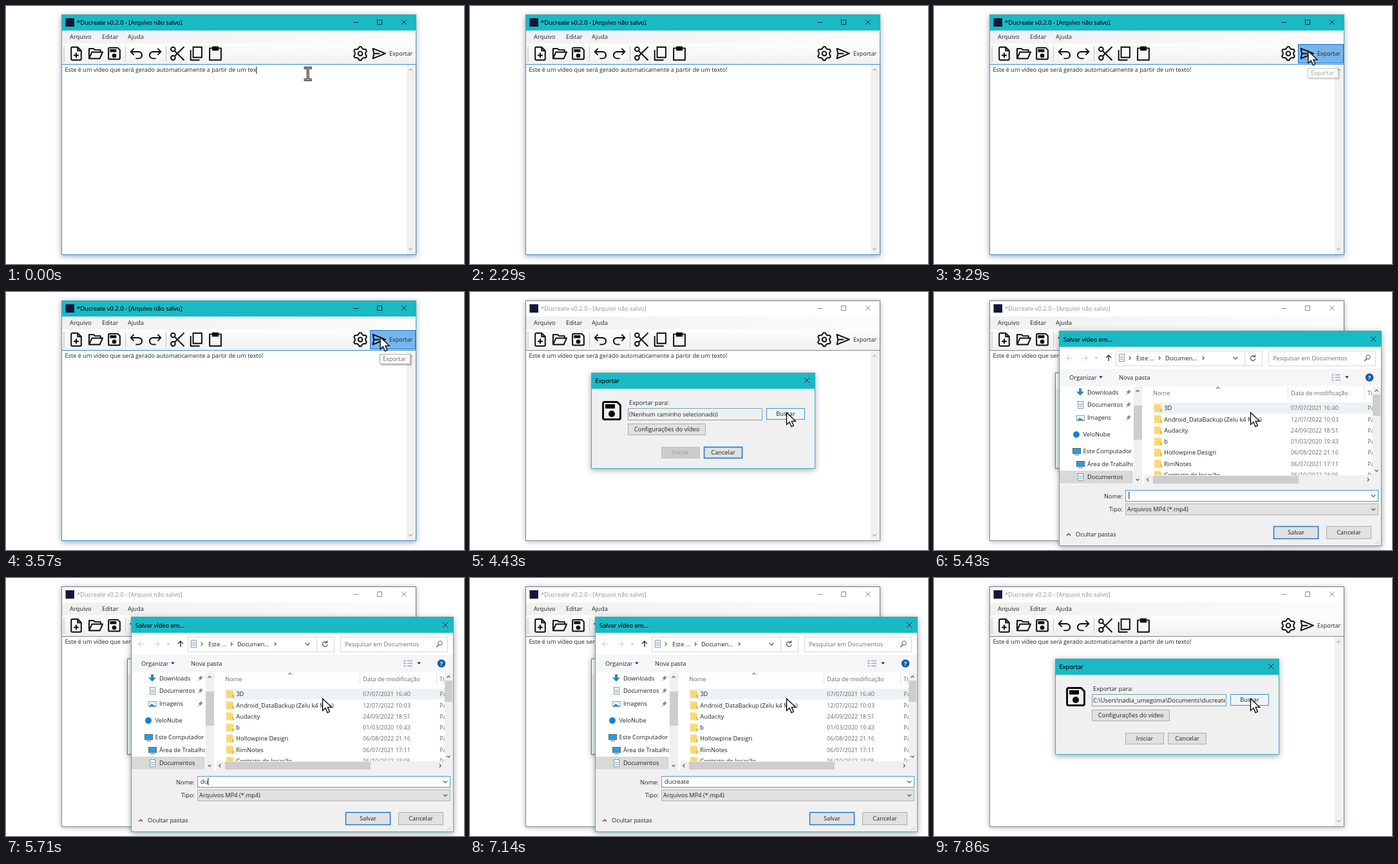
An HTML page for the animation above (8 s loop, 711x400 px).

```html
<!DOCTYPE html>
<html lang="pt-BR">
<head>
<meta charset="utf-8">
<title>Exportar vídeo</title>
<style>
  html, body { margin: 0; width: 100%; height: 100%; overflow: hidden; background: #fff; }
  svg { display: block; }
  #stage { width: 100vw; height: 100vh; }
  text { font: 9.3px "Open Sans", "Noto Sans", sans-serif; fill: #222; white-space: pre; }
  .win { filter: drop-shadow(0 2px 5px rgba(0, 0, 0, .36)); }
  .win.off { filter: drop-shadow(0 1px 4px rgba(0, 0, 0, .3)); }
  .bar { fill: #18bac5; }
  .cap { fill: #000; stroke: #000; stroke-width: .15; }
  .ctl { stroke: #0b2526; }
  .edge { fill: none; stroke: #3fa9b8; }
  .off .bar { fill: #fff; }
  .off .cap { fill: #8f8f8f; stroke: none; }
  .off .ctl { stroke: #8a8a8a; }
  .off .edge { stroke: #787878; }
  .dim { fill: #6d6d6d; }
  .mid { text-anchor: middle; }
</style>
</head>
<body>
<svg id="stage" viewBox="0 0 711 400" preserveAspectRatio="none"></svg>
<script>
const FPS = 7, LOOP = 8000;
const $ = id => document.getElementById(id);

// Markup helpers
const text = (x, y, s, more = '') => `<text x="${x}" y="${y + 3.3}" ${more}>${s}</text>`;
const rect = (x, y, w, h, fill, more = '') =>
  `<rect x="${x}" y="${y}" width="${w}" height="${h}" fill="${fill}" ${more}/>`;
const frame = (x, y, w, h, fill, line, more = '') =>
  rect(x + .5, y + .5, w - 1, h - 1, fill, `stroke="${line}" ${more}`);
const line = (d, color = '#111', width = 1, more = '') =>
  `<path d="${d}" fill="none" stroke="${color}" stroke-width="${width}" ${more}/>`;
const fill = (d, color) => `<path d="${d}" fill="${color}"/>`;
const disc = (x, y, r, color) => `<circle cx="${x}" cy="${y}" r="${r}" fill="${color}"/>`;
const clip = (x, y, w, h, body) =>
  `<svg x="${x}" y="${y}" width="${w}" height="${h}" viewBox="${x} ${y} ${w} ${h}">${body}</svg>`;
const group = (id, body, cls = '') => `<g id="${id}" class="${cls}">${body}</g>`;
const turns = { up: [-1, 0], down: [1, 0], left: [0, -1], right: [0, 1] };
function chevron(x, y, dir, color = '#555', r = 2.5, width = 1.1) {
  const [v, h] = turns[dir], k = r / 2;
  const d = v ? `M${x - r} ${y - v * k}l${r} ${v * r} ${r} ${-v * r}`
              : `M${x - h * k} ${y - r}l${h * r} ${r} ${-h * r} ${r}`;
  return line(d, color, width);
}
const cross = (x, y) => line(`M${x - 3.7} ${y - 3.7}l7.4 7.4m0-7.4l-7.4 7.4`, '', 1, 'class="ctl"');
const button = (x, y, w, h, label, id = '') =>
  `<g id="${id}">${frame(x, y, w, h, '#e1e1e1', '#adadad')}${text(x + w / 2, y + h / 2, label, 'class="mid"')}</g>`;
// 24-unit line icon centred on a point
const icon = (x, y, body, k = 1.11) =>
  `<g transform="translate(${x} ${y}) scale(${k}) translate(-12 -12)" fill="none" stroke="#0a0a0a" stroke-width="1.75" stroke-linejoin="round">${body}</g>`;
const path = (d, more = '') => `<path d="${d}" ${more}/>`;

const gear = 'M' + Array.from({ length: 24 }, (_, i) => {
  const a = (i - 1.5) * Math.PI / 12, r = i % 4 === 1 || i % 4 === 2 ? 9.6 : 7.4;
  return `${(12 + r * Math.sin(a)).toFixed(2)} ${(12 - r * Math.cos(a)).toFixed(2)}`;
}).join('L') + 'z';
const solid = 'fill="#0a0a0a" stroke="none"';
const floppy = path('M4 5.5Q4 4 5.5 4H17l3 3v11.5q0 1.5-1.5 1.5h-13Q4 20 4 18.5z')
  + path('M6 6h9v4H6z', solid) + `<circle cx="12" cy="15" r="3" ${solid}/>`;

const toolbar = [
  [109, path('M14 3H6.500Q5 3 5 4.500v15Q5 21 6.500 21h11q1.500 0 1.500-1.500V8zv5h5M12 11v7M8.500 14.500h7')],
  [139, path('M3 19V5h6l2 2h8v3M3 19h15l4-9H7z')],
  [168, floppy],
  [202.500, path('M8.500 5 4 9.500l4.500 4.500M4 9.500h11a4.700 4.700 0 0 1 0 9.400h-4')],
  [231.500, path('M15.500 5 20 9.500l-4.500 4.500M20 9.500H9a4.700 4.700 0 0 0 0 9.400h4')],
  [266, '<circle cx="6" cy="6" r="3"/><circle cx="6" cy="18" r="3"/>' + path('M8.300 8.300 21.500 21.500M8.300 15.700 21.500 2.500')],
  [295, path('M8 3h12v14.500H8zM4.500 7v14H17')],
  [325, path('M4 4.500h16V21H4z') + path('M7.500 2h9v6h-9z', solid)],
  [550, path(gear) + '<circle cx="12" cy="12" r="3"/>'],
  [579, path('M3.500 5 21 12 3.500 19l1.500-7zM5 12h8')]
];

function mainWindow() {
  return rect(86, 13, 551, 373, '#fff')
    + rect(86, 13, 551, 25, '', 'class="bar"')
    + rect(92.5, 19, 13.500, 13, '#15173a')
    + text(110, 25.5, '*Ducreate v0.2.0 - [Arquivo não salvo]', 'class="cap"')
    + line('M539 25.500h8', '', 1, 'class="ctl"')
    + line('M576.500 21.500h7v7h-7z', '', 1, 'class="ctl"') + cross(618, 25)
    + rect(86, 38, 551, 20, 'url(#menu)') + rect(86, 58, 551, 32, 'url(#tools)')
    + text(99, 48, 'Arquivo') + text(149, 48, 'Editar') + text(189, 48, 'Ajuda')
    + line('M90 62v24', '#999', 1.5, 'stroke-dasharray="1.5 1.7"')
    + line('M185.500 62v24M248.500 62v24', '#c4c4c4')
    + frame(565, 59, 71, 30, '#76b5ec', '#1f74bd', 'id="hot"')
    + toolbar.map(([x, body]) => icon(x, 73.7, body)).join('')
    + text(595, 73.5, 'Exportar', 'style="font-size:9px"')
    + rect(622, 91, 14, 294, '#f0f0f0')
    + chevron(628, 99, 'up', '#a5a5a5') + chevron(628, 377, 'down', '#a5a5a5')
    + text(91.5, 99, '', 'id="story" style="font-size:9.200px"')
    + rect(0, 94, 1, 11, '#111', 'id="caret"')
    + frame(86, 13, 551, 373, 'none', '', 'class="edge"')
    + frame(86, 90, 551, 296, 'none', '#4d93cb', 'id="focus"');
}

function exportDialog() {
  return rect(188, 125, 348, 149, '#f0f0f0')
    + rect(188, 125, 348, 25, '', 'class="bar"')
    + text(194.5, 137.5, 'Exportar', 'class="cap"') + cross(523, 137)
    + icon(220, 184, floppy, 1.68)
    + text(247, 172, 'Exportar para:')
    + frame(245, 180, 209, 19, '#f0f0f0', '#7d9fb0')
    + clip(246, 181, 206, 17, text(247, 189.5, '', 'id="dest"'))
    + button(460, 180, 60, 18, 'Buscar', 'browse')
    + button(245, 204, 121, 18, 'Configurações do vídeo')
    + button(297, 240, 60, 18, 'Iniciar', 'start')
    + button(363, 240, 60, 18, 'Cancelar', 'cancel')
    + frame(188, 125, 348, 149, 'none', '', 'class="edge"');
}

const page = (x, y) => frame(x - 4, y - 6, 9, 12, '#fafafa', '#8c9aa5') + line(`M${x - 2} ${y - 1}h5m-5 3h5`, '#4e9ad0');
const screen = (x, y) => frame(x - 6, y - 5, 13, 9, '#2f9be0', '#4a6a80') + line(`M${x - 3} ${y + 5.500}h7`, '#56707f');
const photo = (x, y) => frame(x - 6, y - 4, 13, 9, '#e8f4fb', '#8ba5b5') + fill(`M${x - 5} ${y + 4}l4-4 3 2 4 2z`, '#3d86ad');
const arrow = (x, y) => fill(`M${x - 2} ${y - 6}h4v5h4l-6 6-6-6h4z`, '#2d7fd3');
const star = (x, y) => fill(`M${x} ${y - 6}l1.700 4 4.300.300-3.300 2.800 1 4.200-3.700-2.300-3.700 2.300 1-4.200-3.300-2.800 4.300-.300z`, '#2a7fd0');
const cloud = (x, y) => disc(x, y, 5, '#1580d0');
const pin = y => line(`M298 ${y + 4}l3-3`, '#7b8c98') + fill(`M298.500 ${y - 1}l2-.5 2-2.500 3 3-2.500 2-.5 2z`, '#7b8c98');

// label, y, indent, icon, pinned
const places = [
  ['Acesso rápido', 169, 0, star], ['Área de Trabalho', 188, 1, screen, 1],
  ['Downloads', 207.5, 1, arrow, 1], ['Documentos', 227, 1, page, 1], ['Imagens', 247, 1, photo, 1],
  ['VeloNube', 273, 0, cloud], ['Este Computador', 299, 0, screen],
  ['Área de Trabalho', 319, 1, screen], ['Documentos', 339, 1, page]
];
const tree = places.map(([name, y, deep, mark, pinned]) =>
  mark(deep ? 227 : 221, y) + text(deep ? 238 : 231.5, y, name) + (pinned ? pin(y) : '')).join('');

const files = [
  ['3D', '07/07/2021 16:40'], ['Android_DataBackup (Zelu k4 Mini)', '12/07/2022 10:03'],
  ['Audacity', '24/09/2022 18:51'], ['b', '01/03/2020 19:43'],
  ['Hollowpine Design', '06/08/2022 21:16'], ['RimNotes', '06/07/2021 17:11'],
  ['Contrato de locação', '06/10/2022 23:05']
];
const rows = files.map(([name, date], i) => {
  const y = 180 + i * 17.25;
  return fill(`M342 ${y - 6}h9l2 2v10h-11z`, '#fbd774') + fill(`M351 ${y + 1}h3v5h-3z`, '#eebf4a')
    + text(357.3, y, name) + text(554, y, date, 'class="dim" style="font-size:9.100px"')
    + text(673, y, 'Pasta', 'class="dim"');
}).join('');

function readyParts() {
  const nav = line('M215 102.500h-9m4-4l-4 4 4 4M229 102.500h9m-4-4l4 4-4 4', '#d2d2d2', 1.2)
    + chevron(252, 102, 'down', '#bbb', 2) + line('M271 107v-9m-4 4l4-4 4 4', '#333', 1.4)
    + frame(282, 91, 228, 24, '#fff', '#d9d9d9') + line('M482.500 91v24', '#d9d9d9')
    + page(291, 102) + chevron(304, 102.5, 'right') + text(314, 102.5, 'Este ...')
    + chevron(350, 102.5, 'right') + text(359, 102.5, 'Documen...') + chevron(418, 102.5, 'right')
    + chevron(468, 102.5, 'down', '#555', 3.5)
    + line('M498 100a3.800 3.800 0 1 0 1 3M498.500 97v3.500h-3.500', '#555', 1.2)
    + frame(519, 91, 167, 24, '#fff', '#d9d9d9') + text(526, 102.5, 'Pesquisar em Documentos', 'class="dim" style="font-size:9.200px"')
    + '<circle cx="674" cy="101" r="3.200" fill="none" stroke="#555"/>' + line('M671.700 103.500l-3.500 3.500', '#555', 1.3);
  const commands = rect(195, 119, 499, 27, '#f5f6f7')
    + text(210, 132.5, 'Organizar') + fill('M256 130.500h6l-3 3.500z', '#1e395b') + text(287, 132.5, 'Nova pasta')
    + line('M617 128.500h4m2 0h8M617 132.500h4m2 0h8M617 136.500h4m2 0h8', '#9aabb8', 1.4)
    + fill('M638 130.500h6l-3 3.500z', '#333') + disc(676, 132.5, 6.2, '#1c56a8')
    + text(676, 132.5, '?', 'class="mid" style="fill:#fff;font-weight:700"');
  const list = clip(326, 165, 356, 119, rect(340, 171.5, 342, 17, '#edf2f4') + rows);
  const form = rect(195, 298, 499, 96, '#f0f0f0')
    + text(293, 316.5, 'Nome:', 'text-anchor="end"') + frame(297, 307, 393, 18, '#fff', '#4a98d0')
    + text(302, 315.5, '', 'id="file"') + rect(0, 310, 1, 11, '#111', 'id="fileCaret"')
    + chevron(682, 316, 'down', '#555', 3)
    + text(293, 337, 'Tipo:', 'text-anchor="end"') + frame(297, 328, 393, 18, '#e1e1e1', '#b4b4b4')
    + text(300, 337, 'Arquivos MP4 (*.mp4)') + chevron(682, 337, 'down', '#555', 3)
    + chevron(209, 376, 'up', '#333', 3) + text(220, 376, 'Ocultar pastas')
    + button(527, 363, 70, 20, 'Salvar', 'save') + button(609, 363, 70, 20, 'Cancelar')
    + line('M685 391l6-6m-3 6l3-3', '#aaa', 1, 'stroke-dasharray="1.5 1"');
  return nav + commands + list + form;
}

function saveDialog() {
  const scroll = rect(310, 147, 13, 151, '#f0f0f0') + rect(310, 176, 13, 53, '#cdcdcd', 'id="thumb"')
    + chevron(316, 153.5, 'up') + chevron(316, 291, 'down')
    + rect(681, 147, 13, 137, '#f0f0f0') + rect(681, 159, 12, 33, '#cdcdcd')
    + chevron(687, 153, 'up') + chevron(687, 277, 'down')
    + rect(326, 284, 368, 14, '#f0f0f0') + rect(340, 285, 226, 12, '#cdcdcd')
    + chevron(332, 291, 'left') + chevron(674, 291, 'right');
  const waiting = text(466, 184, 'Trabalhando nisso...', 'class="dim"') + rect(195, 351, 499, 43, '#f0f0f0')
    + rect(204, 367, 94, 16, '#fff') + rect(526, 363, 72, 20, '#fff') + rect(608, 363, 72, 20, '#fff');
  return rect(194, 60, 501, 334, '#fff') + rect(194, 60, 501, 25, '', 'class="bar"')
    + text(201, 73.5, 'Salvar vídeo em...', 'class="cap"') + cross(682, 73)
    + clip(195, 147, 114, 151, `<g id="tree">${rect(195, 329, 114, 20, '#d9d9d9')}${tree}</g>`)
    + text(340, 156.5, 'Nome', 'class="dim"') + text(554, 156.5, 'Data de modificação', 'class="dim"')
    + clip(670, 147, 11, 18, text(673, 156.5, 'Tipo', 'class="dim"'))
    + line('M549.500 147v18M668.500 147v18', '#e2e2e2') + chevron(441, 148.5, 'up', '#777')
    + group('waiting', waiting) + group('ready', readyParts()) + scroll
    + frame(194, 60, 501, 334, 'none', '', 'class="edge"');
}

const tooltip = rect(582, 98, 48, 16, '#000', 'opacity=".22"') + frame(580, 96, 48, 16, '#fff', '#a5a5a5')
  + text(585, 104, 'Exportar', 'style="font-size:9px;fill:#666"');
const beam = 'M462.500 96h12.500M468.700 96v18.500M462.500 114.500h12.500';

$('stage').innerHTML = `<defs>
  <linearGradient id="menu"><stop stop-color="#f0f0f0"/><stop offset="1" stop-color="#fcfcfc"/></linearGradient>
  <linearGradient id="tools" x2="0" y2="1"><stop stop-color="#fdfdfd"/><stop offset="1" stop-color="#f1f1f1"/></linearGradient>
  </defs>`
  + group('main', mainWindow(), 'win')
  + group('tip', tooltip)
  + group('export', exportDialog(), 'win')
  + group('picker', saveDialog(), 'win')
  + group('beam', line(beam, '#0a0a0a', 3.6) + line(beam, '#fff', 1.2))
  + group('pointer', '<path d="M0 0V18.500l4.400-4 3.200 7.300 3.300-1.500-3.200-7H14z" fill="#fff" stroke="#000" stroke-width="1.300"/>');

const set = (id, name, value) => $(id).setAttribute(name, value);
const show = (id, on) => set(id, 'opacity', +on);
const within = (n, a, b) => n >= a && n < b;
const zoom = (id, x, y, k) => set(id, 'transform', `translate(${x} ${y}) scale(${k}) translate(${-x} ${-y})`);
function paint(id, back, edge, ink = '#222') {
  const box = $(id).firstChild;
  box.setAttribute('fill', back);
  box.setAttribute('stroke', edge);
  $(id).lastChild.style.fill = ink;
}
function type(id, caret, x, value) {
  const el = $(id);
  if (el.textContent !== value) el.textContent = value;
  set(caret, 'x', Math.round(x + el.getComputedTextLength()) + .3);
}

const stops = [[17, 468, 104], [20, 581, 70], [27, 581, 70], [30, 491.5, 187]];
function pointerAt(n) {
  const i = stops.findIndex(s => s[0] > n);
  if (i < 0) return stops[stops.length - 1].slice(1);
  const [a, ax, ay] = stops[i - 1] || stops[0], [b, bx, by] = stops[i];
  const u = Math.max(0, (n - a) / (b - a)), e = u * u * (3 - 2 * u);
  return [ax + (bx - ax) * e, ay + (by - ay) * e];
}
// number of keys pressed so far
const keys = (n, times) => times.filter(t => n >= t).length;

function draw(ms) {
  const n = Math.floor((ms % LOOP + 6) * FPS / 1000) % 56;
  const away = n >= 26, saved = n >= 53, ready = n >= 38, picking = within(n, 34, 53);

  type('story', 'caret', 91.5, 'Este é um vídeo que será gerado automaticamente a partir de um tex'
    + 'to!'.slice(0, keys(n, [1, 3, 4])));
  show('caret', n < 8 || within(n, 12, 16) || within(n, 19, 23));
  $('main').classList.toggle('off', away);
  set('focus', 'stroke', away ? '#7d8a92' : '#3d8aca');
  show('hot', within(n, 20, 26));
  show('tip', n === 23 ? .6 : within(n, 24, 26));
  show('beam', n < 8 ? 1 : n === 8 ? .5 : 0);

  show('export', n === 26 ? .55 : away);
  zoom('export', 362, 199.5, n === 26 ? .97 : 1);
  $('export').classList.toggle('off', picking);
  const dest = saved ? 'C:\\Users\\nadia_umegoma\\Documents\\ducreate.mp4' : '(Nenhum caminho selecionado)';
  if ($('dest').textContent !== dest) $('dest').textContent = dest;
  paint('browse', n < 30 ? '#e1e1e1' : within(n, 32, 34) ? '#cce4f7' : '#eff4f7', n < 30 ? '#adadad' : '#3f8fca');
  paint('start', saved ? '#e1e1e1' : '#cccccc', saved ? '#adadad' : '#bfbfbf', saved ? '#222' : '#9a9a9a');
  paint('cancel', '#e1e1e1', n < 32 ? '#1f7ad0' : '#adadad');
  $('cancel').firstChild.setAttribute('stroke-width', n < 32 ? 1.6 : 1);

  const fading = n === 36 || n === 52;
  show('picker', fading ? .55 : within(n, 37, 52));
  zoom('picker', 444.5, 227, fading ? .98 : 1);
  show('ready', ready);
  show('waiting', !ready);
  set('tree', 'transform', `translate(0 ${ready ? -52 : 0})`);
  set('thumb', 'y', ready ? 176 : 160);
  paint('save', '#e1e1e1', '#1f7ad0');
  $('save').firstChild.setAttribute('stroke-width', 1.5);
  type('file', 'fileCaret', 302, 'ducreate'.slice(0, keys(n, [39, 40, 41, 43, 44, 46, 47, 49])));
  show('fileCaret', n < 50);

  const [x, y] = pointerAt(n);
  show('pointer', n >= 17);
  set('pointer', 'transform', `translate(${x} ${y})`);
}

const began = performance.now();
function tick() {
  draw(performance.now() - began);
  requestAnimationFrame(tick);
}
tick();
</script>
</body>
</html>
```
